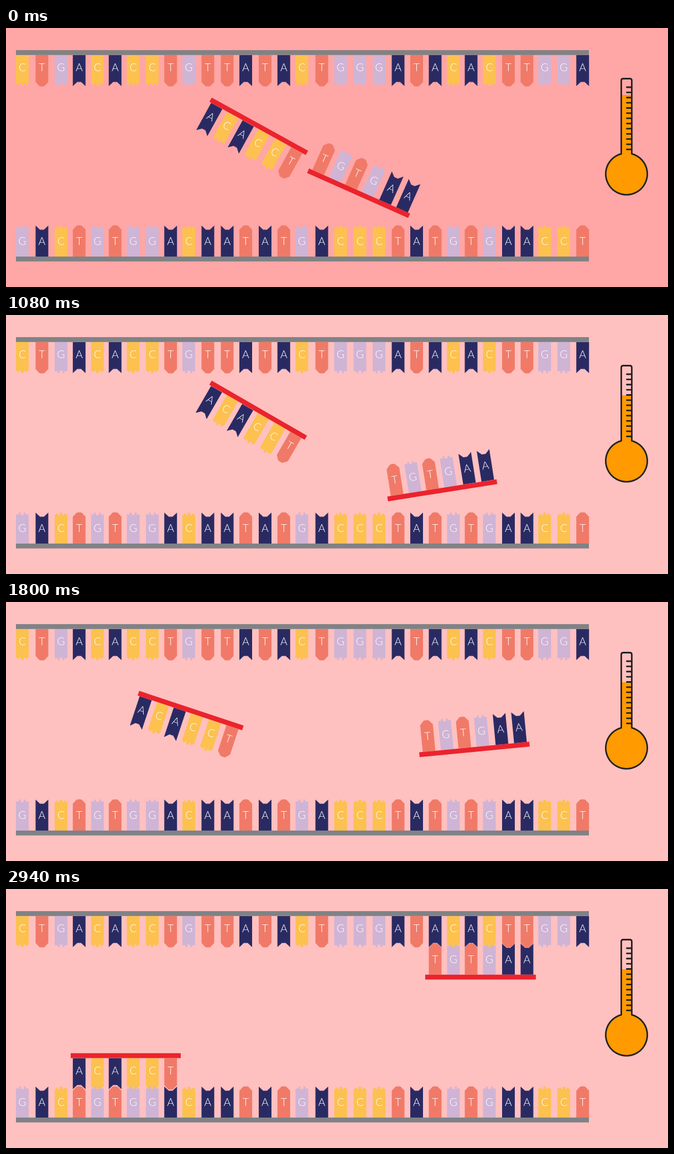
Animation, 1197 px wide and 468 px high, one loop 4.2 s. Source, as an HTML page:

```html
<!DOCTYPE html>
<html lang="en">
<head>
<meta charset="utf-8">
<title>Primer annealing</title>
<style>
  html, body { margin: 0; width: 100%; height: 100%; overflow: hidden; background: #ffa6a5; }
  svg { display: block; width: 1197px; height: 468px; }
  text { font: 300 19.5px Lato, "Open Sans", sans-serif; fill: #fff; text-anchor: middle; }
  .A { fill: #2a2a63; }
  .C { fill: #fcc14f; }
  .G { fill: #cfb4d5; }
  .T { fill: #f07a67; }
  .strand { fill: #808285; }
  .primer { fill: #eb232c; }
  .glass { fill: none; stroke: #222; stroke-width: 2.8; stroke-linecap: round; stroke-linejoin: round; }
  .liquid { fill: #ff9a00; }
</style>
</head>
<body>
<svg id="stage" viewBox="0 0 1197 468">
  <g id="primers"></g>
  <g id="strands"></g>
  <rect id="level" class="liquid" x="1113" width="18.5"/>
  <circle class="liquid" cx="1122.5" cy="263.5" r="37.5"/>
  <path class="glass" d="M1112.5 227.3V95q0-3.5 3.5-3.5h12q3.5 0 3.5 3.5V227.3A37.6 37.6 0 1 1 1112.5 227.3Z"/>
  <path id="ticks" class="glass"/>
</svg>
<script>
const LOOP = 4200, STEP = 60, END = 2940, TURN = 900;
const byId = id => document.getElementById(id);

const sequence = "CTGACACCTGTTATACTGGGATACACTTGGA";
const pair = { A: "T", T: "A", C: "G", G: "C" };
const centers = [29.5, 65, 99.5, 132.3, 165.3, 197.3, 230, 264.5, 297.7, 330.5, 365,
  400, 433.5, 468.5, 502.3, 535, 571, 605, 640, 674.5, 709, 742.5, 776, 809, 841,
  874, 908.5, 942, 974, 1008.5, 1042.7];

// Free ends of the bases, drawn from the right side to the left
const ends = {
  A: "V56L3.5 48.5H-3.5L-11.5 56",
  T: "V48.5L4.5 56Q0 57-4.5 56L-11.5 48.5",
  C: "V52H8.5V54H5.5V51.5H2.2V56H-2.2V51.5H-5.5V54H-8.5V52H-11.5",
  G: "V52.5H6V56H2.8V51.5H-2.8V56H-6V52.5H-11.5"
};

function base(letter, x, y, dir) {
  const baseline = y + (dir > 0 ? 29 : -21);
  return `<path class="${letter}" transform="translate(${x} ${y}) scale(1 ${dir})"
    d="M-11.5 0H11.5${ends[letter]}Z"/><text x="${x}" y="${baseline}">${letter}</text>`;
}

// dir 1: bases hang below the bar, -1: bases stand on it
function chain(letters, first, y, dir, kind, left, right) {
  const top = dir > 0 ? y - 9 : y;
  const bases = [...letters].map((c, i) => base(c, centers[first + i], y, dir)).join("");
  return `${bases}<rect class="${kind}" x="${left}" y="${top}" width="${right - left}" height="8.8"/>`;
}

const complement = [...sequence].map(c => pair[c]).join("");
byId("strands").innerHTML =
  chain(sequence, 0, 49, 1, "strand", 18, 1054) +
  chain(complement, 0, 413, -1, "strand", 18, 1054);

// Path points are [time, x, y] of the centre; angles at start, turn and end
const primers = [
  {
    art: chain("ACACCT", 3, 305.7, 1, "primer", 117, 316),
    path: [[0, 443.5, 202], [600, 463.7, 192.3], [TURN, 473, 192.2], [1080, 442, 196.2],
      [1560, 365.8, 210.6], [2040, 286.9, 238], [2520, 230.3, 279.3], [END, 216.5, 329]],
    angles: [28.9, 32.9, 0]
  },
  {
    art: chain("TGTGAA", 22, 154.8, -1, "primer", 758, 958),
    path: [[0, 649, 272.8], [600, 731.7, 294], [TURN, 767, 297.5], [1080, 784.5, 288.9],
      [1560, 828.2, 258.2], [2040, 856.2, 216.6], [2520, 866.4, 170.5], [END, 858, 131]],
    angles: [24, -9.8, 0]
  }
];
byId("primers").innerHTML = primers.map(p => `<g>${p.art}</g>`).join("");
primers.forEach((p, i) => p.node = byId("primers").children[i]);

byId("ticks").setAttribute("d",
  Array.from({ length: 13 }, (_, i) => `M1122.5 ${107 + i * 9.37}H1130.5`).join(""));

const mix = (a, b, k) => a + (b - a) * Math.min(1, Math.max(0, k));

// Smooth curve through timed points
function along(points, t, axis) {
  const last = points.length - 1;
  let i = 0;
  while (i < last - 1 && t >= points[i + 1][0]) i++;
  const slope = n => {
    const a = points[Math.max(0, n - 1)], b = points[Math.min(last, n + 1)];
    return (b[axis] - a[axis]) / (b[0] - a[0]);
  };
  const p = points[i], q = points[i + 1], d = q[0] - p[0], u = (t - p[0]) / d, v = 1 - u;
  return v * v * (1 + 2 * u) * p[axis] + u * u * (1 + 2 * v) * q[axis] +
    d * u * v * (v * slope(i) - u * slope(i + 1));
}

function place({ node, path, angles }, t) {
  const early = t < TURN;
  const leg = early ? path.slice(0, 3) : path.slice(2);
  const angle = early ? mix(angles[0], angles[1], t / TURN)
    : mix(angles[1], angles[2], (t - TURN) / (END - TURN));
  const [, homeX, homeY] = path[path.length - 1];
  node.setAttribute("transform",
    `translate(${along(leg, t, 1)} ${along(leg, t, 2)}) rotate(${angle}) translate(${-homeX} ${-homeY})`);
}

function draw(t) {
  primers.forEach(p => place(p, t));
  const shade = Math.round(mix(166, 192, t / 1020));
  document.body.style.background = `rgb(255, ${shade}, ${shade})`;
  const y = mix(121, 145, t / 600);
  byId("level").setAttribute("y", y);
  byId("level").setAttribute("height", 232 - y);
}

const start = performance.now();
function tick() {
  const t = (performance.now() - start) % LOOP;
  draw(Math.min(END, Math.floor(t / STEP) * STEP));
  requestAnimationFrame(tick);
}
tick();
</script>
</body>
</html>
```
